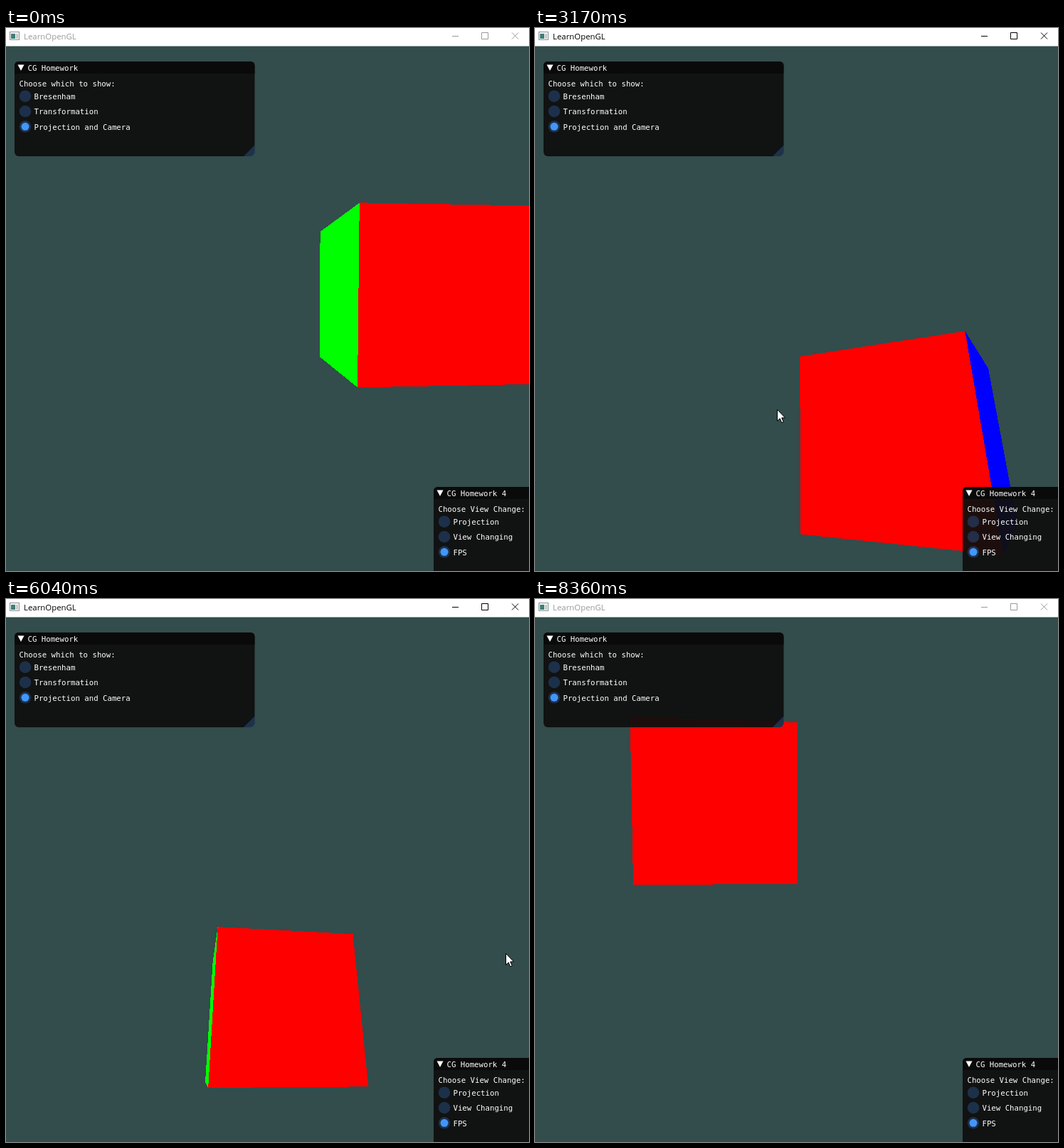
An HTML page for the animation above (8430 ms loop, 735 by 762 pixels).

```html
<!DOCTYPE html>
<html lang="en">
<head>
<meta charset="utf-8">
<title>LearnOpenGL</title>
<style>
html, body { margin: 0; width: 100%; height: 100%; overflow: hidden; background: #334c4c; }
svg { display: block; }
.panel text { font: 10.7px "DejaVu Sans Mono", monospace; fill: #fff; }
.caption { font: 11.4px "Open Sans", "Noto Sans", sans-serif; }
</style>
</head>
<body>
<svg width="735" height="762" viewBox="0 0 735 762">
  <g shape-rendering="crispEdges">
    <polygon id="left" fill="#0f0"/>
    <polygon id="right" fill="#00f"/>
    <polygon id="front" fill="#f00"/>
  </g>
  <g id="panels"></g>
  <rect width="735" height="25.5" fill="#fff"/>
  <rect x="5.5" y="5.5" width="13" height="11" fill="#f4f4f4" stroke="#8a9499"/>
  <rect x="7" y="8" width="6" height="7" fill="#3f7f78"/>
  <rect x="14" y="8" width="3" height="7" fill="#c4cacc"/>
  <g id="bar">
    <text class="caption" x="25" y="16">LearnOpenGL</text>
    <path id="buttons" d="M627 11.5h9M668.5 6.5h9v9h-9zM711 6.5l9 9M720 6.5l-9 9" fill="none"/>
  </g>
  <path id="cursor" d="M.5 .5V16.5L4.2 13 6.7 18.8 9.2 17.7 6.7 12H11.5Z" fill="#fff" stroke="#000"/>
</svg>
<script>
const $ = id => document.getElementById(id);

function panel(x, y, title, heading, options) {
  const w = 337.5, h = 133;
  const rows = options.map((label, i) => {
    const cy = 48.7 + 21.3 * i;
    const dot = i === 2 ? `<circle cx="15" cy="${cy}" r="5.5" fill="#4296fa"/>` : "";
    return `<circle cx="15" cy="${cy}" r="8.3" fill="#294a7a" fill-opacity=".54"/>${dot}
      <text x="27.5" y="${cy + 4.2}">${label}</text>`;
  }).join("");
  return `<g class="panel" transform="translate(${x} ${y})">
    <rect width="${w}" height="${h}" rx="6" fill="#0f0f0f" fill-opacity=".94"/>
    <path d="M0 17V6Q0 0 6 0H${w - 6}Q${w} 0 ${w} 6V17Z" fill="#0a0a0a"/>
    <path d="M4.5 4.5h9l-4.5 8.5z" fill="#fff"/>
    <path d="M${w - 15.5} ${h}L${w} ${h - 15.5}V${h - 6}Q${w} ${h} ${w - 6} ${h}Z" fill="#4296fa" fill-opacity=".25"/>
    <text x="18.5" y="12.5">${title}</text>
    <text x="6.5" y="34.5">${heading}</text>${rows}</g>`;
}

$("panels").innerHTML =
  panel(12, 47, "CG Homework", "Choose which to show:",
    ["Bresenham", "Transformation", "Projection and Camera"]) +
  panel(601, 644, "CG Homework 4", "Choose View Change:",
    ["Projection", "View Changing", "FPS"]);

// Mouse path [step, x, y]; it also turns the camera
const mouse = [
  [0, 657, 753], [5, 570, 698], [20, 400, 693], [28, 390, 666], [35, 340, 535],
  [43, 363, 614], [52, 560, 664], [60, 663, 555], [63, 663, 630], [72, 702, 497],
  [89, 520, 684], [100, 665, 753]
];
// Walk [step, x, y, z]: middle of the cube's front face as seen from the camera
const walk = [
  [0, 1.147, -.025, 2.044], [8, 1.147, -.025, 2.044], [28, -.197, -.016, 1.939],
  [43, -1.346, .308, 2.243], [60, -.361, .383, 2.695], [72, .57, .393, 2.609],
  [89, .449, .298, 1.998], [100, -.278, .365, 2.407]
];
const TURN = .00195, FOCAL = 540;

function sample(keys, n) {
  const i = Math.max(1, keys.findIndex(k => k[0] >= n));
  const a = keys[i - 1], b = keys[i], f = (n - a[0]) / (b[0] - a[0]);
  return a.slice(1).map((v, j) => v + (b[j + 1] - v) * f);
}

// Perspective view of a unit cube from a camera with yaw and pitch
function projector([x, y, z], yaw, pitch) {
  const cy = Math.cos(yaw), sy = Math.sin(yaw), cp = Math.cos(pitch), sp = Math.sin(pitch);
  return ([a, b, c]) => {
    const px = x + a, py = y + b, pz = z + c;
    const across = px * cy - pz * sy, ahead = px * sy + pz * cy;
    const scale = FOCAL / (py * sp + ahead * cp);
    return [367.5 + across * scale, 394 - (py * cp - ahead * sp) * scale];
  };
}

const side = x => [[x, .5, 0], [x, -.5, 0], [x, -.5, 1], [x, .5, 1]];
const faces = {
  left: side(-.5),
  right: side(.5),
  front: [[-.5, .5, 0], [.5, .5, 0], [.5, -.5, 0], [-.5, -.5, 0]]
};

// The picture advances in uneven steps with two pauses
function stepAt(t) {
  if (t < 220) return 0;
  if (t < 780) return Math.min(5, 1 + Math.floor((t - 220) / 77.5));
  if (t < 1140) return Math.min(8, 6 + Math.floor((t - 780) / 65));
  return Math.min(100, 9 + Math.floor((t - 1140) / 77.5 + .05));
}

function draw(now) {
  const t = now % 8430, n = stepAt(t);
  const [x, y] = sample(mouse, n);
  const project = projector(sample(walk, n), TURN * (x - 619), TURN * (730 - y));
  for (const id in faces) $(id).setAttribute("points", faces[id].map(project).join(" "));

  $("cursor").setAttribute("transform", `translate(${Math.round(x)} ${Math.round(y)})`);
  $("cursor").setAttribute("visibility", n > 0 && n < 100 ? "visible" : "hidden");
  const ink = t >= 1140 && t < 8360 ? "#000" : "#999";
  $("bar").setAttribute("fill", ink);
  $("buttons").setAttribute("stroke", ink);
  requestAnimationFrame(draw);
}
requestAnimationFrame(draw);
</script>
</body>
</html>
```
